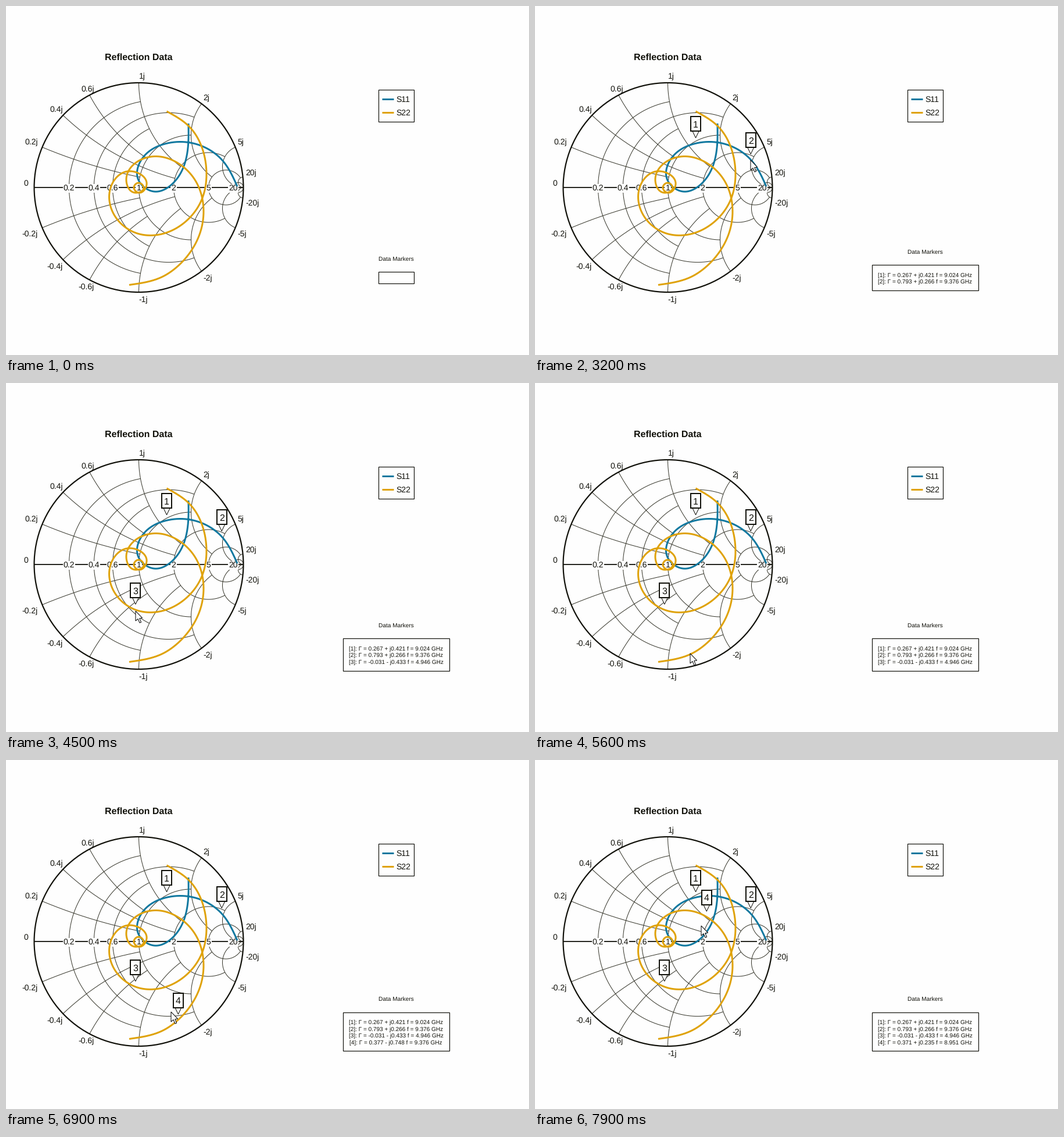
These frames come from a looping animation (900 by 600 pixels, 8000 ms). A matplotlib script:

```python
import numpy as np
import matplotlib.pyplot as plt
from matplotlib.animation import FuncAnimation
from matplotlib.patches import Circle, Polygon, Rectangle

W, H, DPI = 900, 600, 100
STEP, FRAMES = 100, 80
PX = 72 / DPI
BG, INK, GRID = "#fefefe", "#11110a", "#35352a"
BLUE, AMBER = "#0f789f", "#dfa208"
CX, CY, R = 228.5, 312, 180

plt.rcParams["font.family"] = "Liberation Sans"
plt.rcParams["text.hinting"] = "none"

fig = plt.figure(figsize=(W / DPI, H / DPI), dpi=DPI, facecolor=BG)
ax = fig.add_axes([0, 0, 1, 1])
ax.set_xlim(0, W)
ax.set_ylim(H, 0)
ax.axis("off")


def label(x, y, text, size=14, z=2, ha="center", **kw):
    """Text whose capitals are centred on y."""
    return ax.text(x, y + 0.36 * size, text, fontsize=size * PX, color=INK,
                   ha=ha, va="baseline", zorder=z, **kw)


def line(x, y, color, width, z):
    ax.plot(x, y, color=color, lw=width * PX, zorder=z,
            solid_capstyle="butt")


def frame_box(x, y, w, h, width, z=2):
    return ax.add_patch(Rectangle((x, y), w, h, fc=BG, ec=INK,
                                  lw=width * PX, zorder=z))


def to_px(gamma):
    return CX + R * gamma.real, CY - R * gamma.imag


def to_gamma(x, y):
    return complex((x - CX) / R, (CY - y) / R)


def reflect(z):
    return (z - 1) / (z + 1)


def spline(pts):
    """Natural cubic spline by chord length: knot positions and evaluator."""
    p = np.array(pts, float)
    s = np.r_[0, np.cumsum(np.hypot(*np.diff(p, axis=0).T))]
    h, m = np.diff(s), len(s)
    a, b = np.eye(m), np.zeros((m, 2))
    for i in range(1, m - 1):
        a[i, i - 1:i + 2] = h[i - 1], 2 * (h[i - 1] + h[i]), h[i]
        b[i] = 6 * ((p[i + 1] - p[i]) / h[i] - (p[i] - p[i - 1]) / h[i - 1])
    c = np.linalg.solve(a, b)

    def at(u):
        u = np.atleast_1d(u)
        i = np.clip(np.searchsorted(s, u, side="right") - 1, 0, m - 2)
        hi = h[i][:, None]
        r, l = (s[i + 1] - u)[:, None] / hi, (u - s[i])[:, None] / hi
        return (r * p[i] + l * p[i + 1]
                + ((r**3 - r) * c[i] + (l**3 - l) * c[i + 1]) * hi**2 / 6)

    return s, at


def rim_label(x):
    """Reactance label just outside the rim."""
    point = reflect(1j * x)
    px, py = to_px(point)
    side = 1 if x < 0 else -1
    right = point.real > -1e-9
    px += 4.5 * point.real if right else 24 + 34 * point.real
    py += side * (8 + 4 * abs(point.imag))
    label(px, py, f"{x:g}j" if x else "0", ha="left" if right else "right")


# Smith chart: each value's arcs stop where they meet the paired value
GRID_ENDS = {0.2: 1, 0.4: 2, 0.6: 1, 1: 2, 2: 5, 5: 20, 20: 1e4}
rim_label(0)
line([CX - R, CX + R], [CY, CY], INK, 1.8, 1.2)
for value, end in GRID_ENDS.items():
    scale = value + 1
    sweep = scale * np.tan(np.linspace(0, np.arctan(end / scale), 300))
    for sign in (1, -1):
        for z in (value + sign * 1j * sweep, sweep + sign * 1j * value):
            line(*to_px(reflect(z)), GRID, 1, 1)
        rim_label(sign * value)
    label(to_px(reflect(value))[0], CY, f"{value:g}", z=1.5,
          bbox=dict(fc=BG, ec="none", pad=0.8))
ax.add_patch(Circle((CX, CY), R, fill=False, ec=INK, lw=2.2 * PX, zorder=2))
label(228.5, 87, "Reflection Data", 16, weight="bold")

# Measured traces, smoothed through a few key points
FIXED = [(0.267 + 0.421j, 9.024), (0.793 + 0.266j, 9.376),
         (-0.031 - 0.433j, 4.946)]
FROM, TO = (0.377 - 0.748j, 9.376), (0.371 + 0.235j, 8.951)
S11 = [(314, 202), (312, 252), (290, 302), (255, 319), (227, 297),
       (236, 260), to_px(FIXED[0][0]), (322, 236), to_px(FIXED[1][0]),
       (398, 310)]
S22 = [(212, 479.5), (268, 466), to_px(FROM[0]), (334, 390), (340, 352),
       (327, 302), to_px(TO[0]), (257, 258.5), (218, 274), (207, 300),
       (222, 321), (237, 313), (228.5, 304), (220, 312), (229, 321),
       (242, 307), (213, 284), (182, 307), (183, 353), to_px(FIXED[2][0]),
       (272, 391), (334, 339), (345, 290), (314.5, 206.5), (276.5, 181)]
for pts, color, z in ((S11, BLUE, 3), (S22, AMBER, 3.1)):
    knots, trace = spline(pts)
    line(*trace(np.linspace(0, knots[-1], 1500)).T, color, 3, z)

# Legend
frame_box(640.5, 143.5, 61, 55, 1.2)
for name, color, y in (("S11", BLUE, 160), ("S22", AMBER, 183)):
    line([647, 667], [y, y], color, 3, 3)
    label(671, y, name, ha="left")


class Pin:
    """Numbered callout hovering just above a point of a trace."""

    def __init__(self, number):
        z = 5 + number * 0.1
        self.tip = ax.add_patch(Polygon([(0, 0)] * 3, fc=BG, ec=INK,
                                        lw=PX, zorder=z))
        self.body = frame_box(0, 0, 17, 25, 2, z + 0.01)
        self.text = label(0, 0, str(number), 16, z + 0.02)

    def place(self, x, y, shown):
        self.tip.set_xy([(x - 5.5, y - 21), (x, y - 9.5), (x + 5.5, y - 21)])
        self.body.set_xy((x - 8.5, y - 46))
        self.text.set_position((x, y - 27.5))
        for part in (self.tip, self.body, self.text):
            part.set_visible(shown)


MID = 671
pins = [Pin(k) for k in range(1, 5)]
table_title = label(MID, 0, "Data Markers", 10.1)
table_box = frame_box(0, 0, 0, 0, 1.2)
rows = [label(MID, 0, "", 10.05, 3) for _ in pins]

ARROW = np.array([(0, 0), (0, 17), (4, 13.5), (7, 20.3), (9.6, 19.2),
                  (6.8, 12.6), (11.6, 12)])
cursor = ax.add_patch(Polygon(ARROW, fc="white", ec="black", lw=PX, zorder=9))

CLICKS = (2000, 3200, 4200, 5700)
DRAG = (6200, 6900, 7900)
DRAG_S = [knots[S22.index(p)]
          for p in ((268, 466), to_px(FROM[0]), to_px(TO[0]))]


def dragged(t):
    """Place along S22, its reflection and its frequency."""
    s = np.interp(t, DRAG, DRAG_S)
    slope = (TO[1] - FROM[1]) / (DRAG_S[2] - DRAG_S[1])
    return s, to_gamma(*trace(s)[0]), FROM[1] + slope * (s - DRAG_S[1])


def holding(s):
    """Pointer position while dragging: inside the bend of the trace."""
    (x0, y0), (x, y), (x1, y1) = trace([s - 1, s, s + 1])
    dx, dy = np.array([x1 - x0, y1 - y0]) / np.hypot(x1 - x0, y1 - y0)
    return np.array([x + 18 * dy, y - 18 * dx])


# Pointer moves: start ms, end ms, destination
MOVES = [(100, 300, (276, 236)), (2000, 2500, (371, 265)),
         (3300, 4000, (223, 392)), (4500, 4900, (276, 472)),
         (4900, 5300, (267, 465)), (5700, 6100, holding(DRAG_S[0]))]


def pointer(t):
    if t > DRAG[0]:
        return holding(dragged(t)[0])
    pos = np.array([330, 172])
    for start, end, dest in MOVES:
        u = np.clip((t - start) / (end - start), 0, 1)
        pos = pos + (np.array(dest) - pos) * u * u * (3 - 2 * u)
    return pos


def describe(number, gamma, freq):
    sign = "+" if gamma.imag >= 0 else "-"
    return (f"[{number}]: Γ = {gamma.real:.3f} {sign} j{abs(gamma.imag):.3f}"
            f" f = {freq:.3f} GHz")


def update(i):
    t = i * STEP
    count = sum(t >= c for c in CLICKS)

    half = (21.3 + 11.4 * count) / 2 if count else 10.3
    width = 183 if count else 61
    table_box.set_bounds(MID - width / 2, 467 - half, width, 2 * half)
    table_title.set_y(437.6 - 5.85 * count)

    for k, (gamma, freq) in enumerate(FIXED + [dragged(t)[1:]]):
        shown = k < count
        pins[k].place(*to_px(gamma), shown)
        rows[k].set_text(describe(k + 1, gamma, freq) if shown else "")
        rows[k].set_y(471.3 + 11.7 * (k - (count - 1) / 2))

    cursor.set_xy(ARROW + np.round(pointer(t)))
    cursor.set_visible(t >= MOVES[0][0])
    return []


anim = FuncAnimation(fig, update, frames=FRAMES, interval=STEP,
                     repeat=True, repeat_delay=0, blit=False)
plt.show()
```
